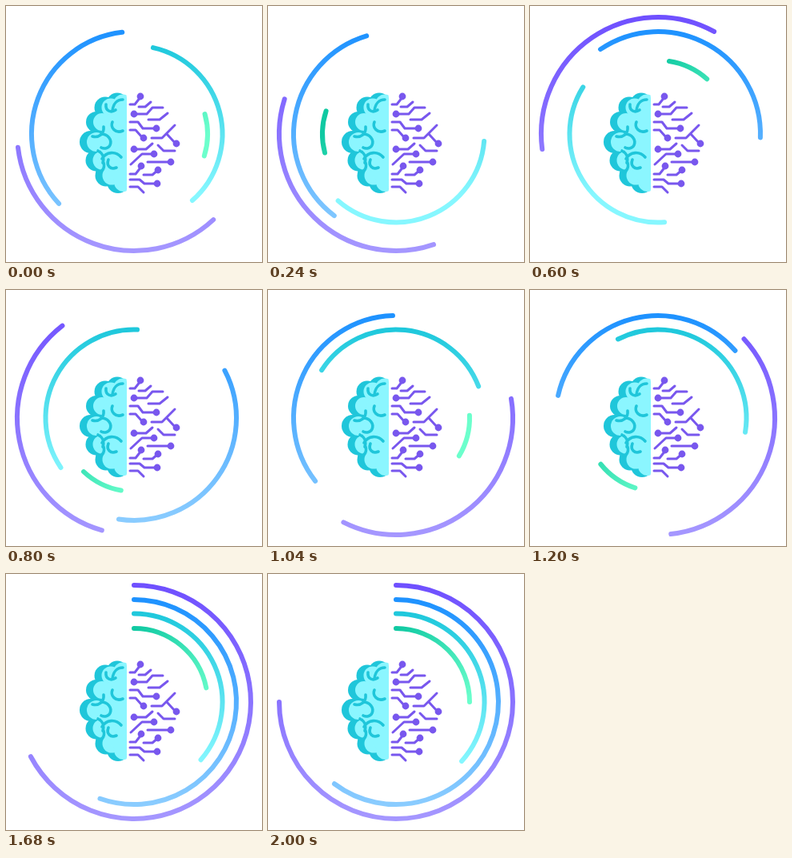
Animation, 320 px wide and 320 px high, one loop 2.12 s. Source, as an HTML page:

```html
<!DOCTYPE html>
<html lang="en">
<head>
<meta charset="utf-8">
<title>Brain loader</title>
<style>
  html, body { margin: 0; width: 100%; height: 100%; overflow: hidden; background: #fff; }
  svg { display: block; width: 100vw; height: 100vh; }
  .ring { fill: none; stroke-width: 6; stroke-linecap: round; }
  .fold { fill: none; stroke: #1fc6da; stroke-width: 3.6; stroke-linecap: round; }
  .wire { fill: none; stroke: #7857ee; stroke-width: 3; stroke-linecap: round; stroke-linejoin: round; }
  .node { fill: #7857ee; }
</style>
</head>
<body>
<svg viewBox="0 0 320 320">
  <defs>
    <clipPath id="half"><path d="M80 100H146Q151 108 151 116V228Q151 234 146 240H80Z"/></clipPath>
  </defs>
  <g id="rings"></g>
  <g clip-path="url(#half)">
    <g id="back" fill="#1fc6da"></g>
    <g id="front" fill="#8bf6ff"></g>
    <g class="fold">
      <path d="M125 123C124 131 131 134 137 130M133 131C134 122 139 117 146 117"/>
      <path d="M108 163C116 165 123 160 122 151M119 160C127 160 133 167 130 174C128 178 123 179 119 177"/>
      <path d="M146 156C137 160 130 152 133 145"/>
      <path d="M115 181C121 184 123 190 121 196M120 191C125 182 137 181 144 189"/>
      <path d="M114 207C120 208 124 203 122 196M128 192C125 200 131 205 138 202"/>
    </g>
  </g>
  <g id="circuit"></g>
</svg>
<script>
const LOOP = 2120, STEP = 40, LAST = 2000, C = 160;
const $ = id => document.getElementById(id);

function add(parent, tag, attrs) {
  const el = document.createElementNS('http://www.w3.org/2000/svg', tag);
  for (const k in attrs) el.setAttribute(k, attrs[k]);
  return parent.appendChild(el);
}

// Brain lobes: x, y, radius
const lobes = [
  [139, 122, 13.5], [124, 127, 13.5], [113, 145, 13], [106, 170, 14],
  [113, 193, 13.5], [125, 212, 13.5], [140, 220, 14]
];
function drawLobes(group, dx, dy, shrink) {
  for (const [x, y, r] of lobes) add(group, 'circle', { cx: x + dx, cy: y + dy, r: r - shrink });
  add(group, 'path', { d: 'M126 122H160V218H128L114 193L110 170L115 147Z', transform: `translate(${dx} ${dy})` });
}
drawLobes($('back'), 0, 0, 0);
drawLobes($('front'), 7, 0, 2);

// Circuit half: wire path, then an optional node
const wires = [
  ['M155 123H161L168 114', 168, 113],
  ['M166 126H174L181 120'],
  ['M160 135H176L183 127H196', 160, 135],
  ['M178 142H192L202 134'],
  ['M155 145H165L171 153H187', 188, 153],
  ['M155 155H162L170 164', 172, 165],
  ['M182 165H195L211 149M201 160L212 172', 213, 172],
  ['M160 179H175L183 172', 160, 179],
  ['M190 174L197 181H211'],
  ['M156 198L170 185H184', 185, 185],
  ['M177 195H205', 206, 195],
  ['M155 210H162L169 201', 169, 200],
  ['M172 211H183L190 205', 190, 205],
  ['M155 217H167L173 222H188', 189, 222],
  ['M155 226H165L172 233']
];
for (const [d, x, y] of wires) {
  add($('circuit'), 'path', { d, class: 'wire' });
  if (x) add($('circuit'), 'circle', { cx: x, cy: y, r: 4.4, class: 'node' });
}

// Rings: start angles in degrees, clockwise from the top, at the key times
const keys = [0, 240, 600, 1040, 1360, 1680];
const rings = [
  { r: 146, colors: ['#6f50ff', '#a597ff'], grad: [160, 14, 160, 306], span: [126.2, 270], turn: [137.2, 161.2, 262.5, 80.5, 25.2, 0] },
  { r: 128, colors: ['#1e92ff', '#8accff'], grad: [160, 32, 160, 288], span: [126.2, 217], turn: [227.2, 217.1, -34.2, 232, 317.8, 360] },
  { r: 110.5, colors: ['#1fc8dc', '#86f7ff'], grad: [160, 50, 160, 236], span: [126.2, 132], turn: [12.5, 94.7, 175.8, 302.8, 351.2, 360] },
  { r: 92, colors: ['#10c9a2', '#6cffcc'], grad: [160, 68, 252, 160], span: [33, 90], turn: [74.3, 255.2, 368.7, 808, 997.5, 1080] }
];
rings.forEach((ring, i) => {
  const [x1, y1, x2, y2] = ring.grad;
  const g = add($('rings'), 'linearGradient', { id: 'g' + i, gradientUnits: 'userSpaceOnUse', x1, y1, x2, y2 });
  ring.colors.forEach((c, k) => add(g, 'stop', { offset: k, 'stop-color': c }));
  ring.el = add($('rings'), 'path', { class: 'ring', stroke: `url(#g${i})` });
  ring.slopes = slopes(ring.turn);
});

// Slopes of a smooth curve that never overshoots its keys
function slopes(v) {
  const sec = v.slice(1).map((b, i) => (b - v[i]) / (keys[i + 1] - keys[i]));
  return v.map((_, i) => {
    if (i === 0) return sec[0];
    if (i === v.length - 1) return 0;
    const a = sec[i - 1], b = sec[i];
    return a * b > 0 ? 2 * a * b / (a + b) : 0;
  });
}

function turnAt({ turn, slopes }, t) {
  if (t >= keys[keys.length - 1]) return turn[turn.length - 1];
  let i = 0;
  while (t >= keys[i + 1]) i++;
  const h = keys[i + 1] - keys[i], u = (t - keys[i]) / h, w = 1 - u;
  return turn[i] * (1 + 2 * u) * w * w + turn[i + 1] * u * u * (3 - 2 * u)
    + h * u * w * (slopes[i] * w - slopes[i + 1] * u);
}

// cubic-bezier(.25, .1, .25, 1)
function ease(x) {
  let lo = 0, hi = 1;
  for (let k = 0; k < 24; k++) {
    const s = (lo + hi) / 2;
    if (0.75 * s * (1 - s) + s ** 3 < x) lo = s; else hi = s;
  }
  const w = 1 - lo;
  return 0.3 * w * w * lo + 3 * w * lo * lo + lo ** 3;
}

function point(r, deg) {
  const a = deg * Math.PI / 180;
  return (C + r * Math.sin(a)).toFixed(2) + ' ' + (C - r * Math.cos(a)).toFixed(2);
}

function draw(now) {
  const t = Math.min(LAST, Math.floor((now % LOOP) / STEP) * STEP);
  const grow = ease(Math.max(0, Math.min(1, (t - 1355) / (LAST - 1355))));
  for (const ring of rings) {
    const { r, span: [from, to] } = ring;
    const a = turnAt(ring, t), span = from + (to - from) * grow;
    ring.el.setAttribute('d', `M${point(r, a)}A${r} ${r} 0 ${span > 180 ? 1 : 0} 1 ${point(r, a + span)}`);
  }
}

const begin = performance.now();
function tick() {
  draw(performance.now() - begin);
  requestAnimationFrame(tick);
}
tick();
</script>
</body>
</html>
```
